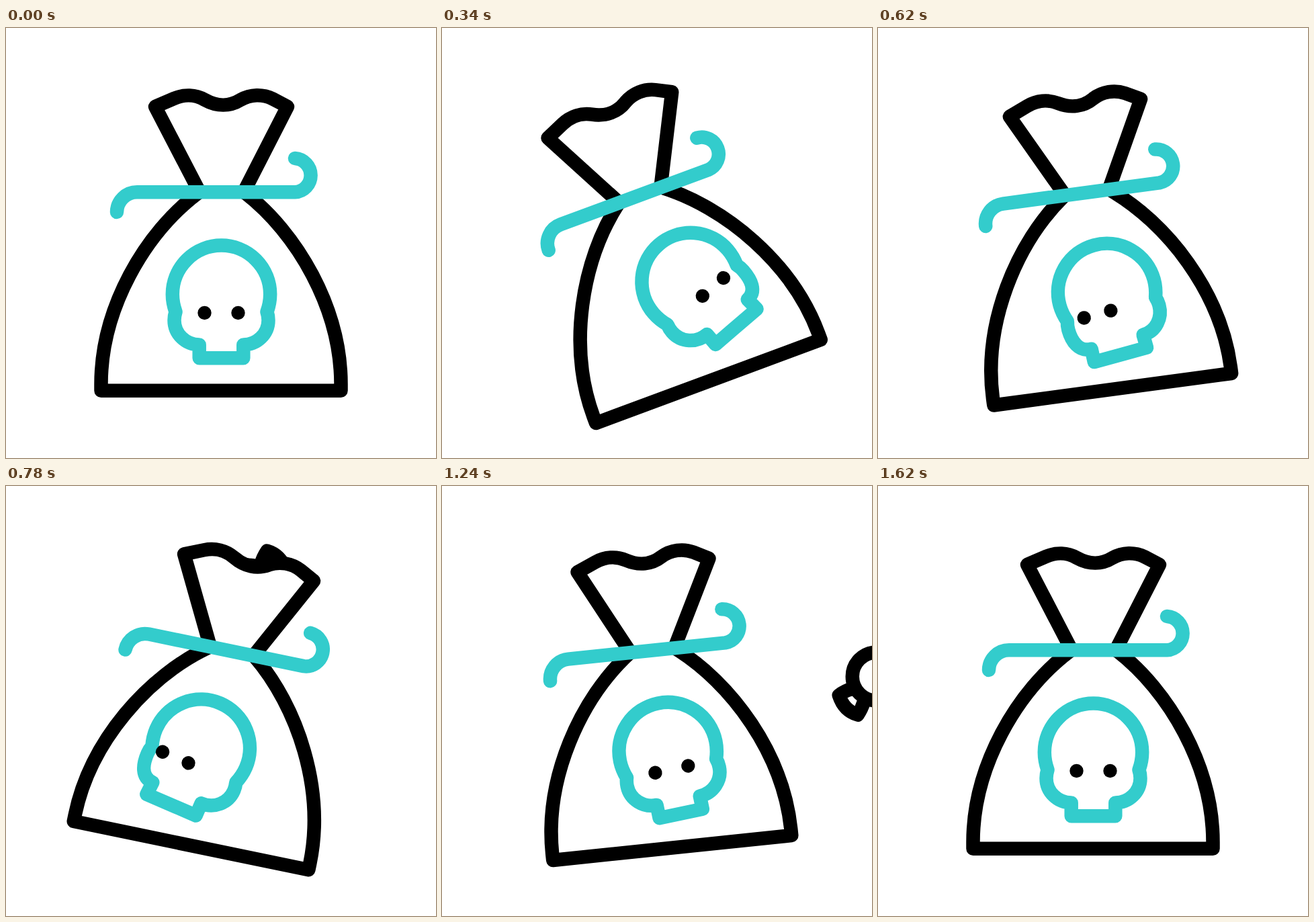
Animation of 640 by 640 pixels, one loop 1900 ms. Source, as an HTML page:

```html
<!DOCTYPE html>
<html lang="en">
<head>
<meta charset="utf-8">
<title>Swinging sweet bag</title>
<style>
html, body { margin: 0; width: 100%; height: 100%; overflow: hidden; background: #fff; }
svg { display: block; width: 100vw; height: 100vh; }
.line { fill: none; stroke: #000; stroke-width: 20.5; stroke-linecap: round; stroke-linejoin: round; }
.teal { stroke: #33cccc; }
</style>
</head>
<body>
<svg viewBox="0 0 640 640">
  <g id="candy" class="line">
    <circle r="36"/>
    <path id="wrap" d="M19 -38Q22 -48 28 -57Q48.5 -51 56 -28Q47 -21 38 -19"/>
    <use href="#wrap" transform="rotate(180)"/>
  </g>
  <g id="bag" class="line">
    <path fill="#fff" d="M222 117L250 105C265 98.5 282 99 296 107C314 117 333 117 349 107C364 98.5 382 98 397 105.5L419 117L354 244C434 305 498.5 418 498.5 530V539.7H141.5V530C141.5 418 206 305 288 244Z"/>
    <path class="teal" d="M165 274A30 30 0 0 1 195 244.3H430A25.2 25.2 0 0 0 430 194"/>
  </g>
  <g id="head">
    <path id="skull" class="line teal"/>
    <circle id="eyeL" cy="424" r="10.2"/>
    <circle id="eyeR" cy="424" r="10.2"/>
  </g>
</svg>
<script>
const LOOP = 1900, MID = 320.5;
const el = id => document.getElementById(id);
const [candy, bag, head, skull, eyeL, eyeR] =
  ['candy', 'bag', 'head', 'skull', 'eyeL', 'eyeR'].map(el);

// [time, value] keys
const SWING = [[0, 0], [460, -24.4], [800, 12], [1200, -6.1], [1620, 0]];
const LOOK_R = [[0, 0], [360, 1], [720, 0]];
const LOOK_L = [[360, 0], [720, 1], [1080, 0]];

const ease = u => u * u * (3 - 2 * u);
const mix = (a, b, k) => a + (b - a) * k;

function track(keys, t) {
  if (t <= keys[0][0]) return keys[0][1];
  for (let i = 1; i < keys.length; i++) {
    const [t0, a] = keys[i - 1], [t1, b] = keys[i];
    if (t < t1) return mix(a, b, ease((t - t0) / (t1 - t0)));
  }
  return keys[keys.length - 1][1];
}

// One cheek and half of the jaw; k is how far the face turns to this side
function cheek(side, k) {
  const p = (x, y) => `${MID + side * x} ${y} `;
  return 'M' + p(68, 422.5) +
    'C' + p(69.3, 426.5) + p(70, 431) + p(70, 435) +
    'C' + p(70, mix(455.5, 452, k)) + p(mix(53, 66, k), 471.5) + p(mix(32.8, 47, k), 471.5) +
    'L' + p(mix(32.8, 48.3, k), 491.3) + 'L' + p(0, 491.3);
}

const cranium = 'M252.5 422.5C249.5 414 247.8 405 247.8 396.3' +
  'A72.7 72.7 0 0 1 393.2 396.3C393.2 405 391.5 414 388.5 422.5';

function draw(t) {
  const angle = track(SWING, t), r = track(LOOK_R, t), l = track(LOOK_L, t);
  bag.setAttribute('transform', `rotate(${angle} 320 320)`);
  head.setAttribute('transform', `rotate(${angle * 2} 320 320)`);
  skull.setAttribute('d', cranium + cheek(-1, l) + cheek(1, r));
  eyeL.setAttribute('cx', 295.5 + 24.7 * r - 27.4 * l);
  eyeR.setAttribute('cx', 345.5 + 15.7 * r - 36.2 * l);

  // The sweet is tossed out of the bag's mouth
  const s = t - 780;
  const x = 360 + 0.5414 * s + 0.000175 * s * s;
  const y = 154.5 - 0.8643 * s + 0.002482 * s * s;
  candy.setAttribute('transform', `translate(${x} ${y})`);
  candy.setAttribute('visibility', t > 750 && t < 1400 ? 'visible' : 'hidden');
}

const start = performance.now();
function tick(now) {
  draw(Math.max(0, now - start) % LOOP);
  requestAnimationFrame(tick);
}
draw(0);
requestAnimationFrame(tick);
</script>
</body>
</html>
```
